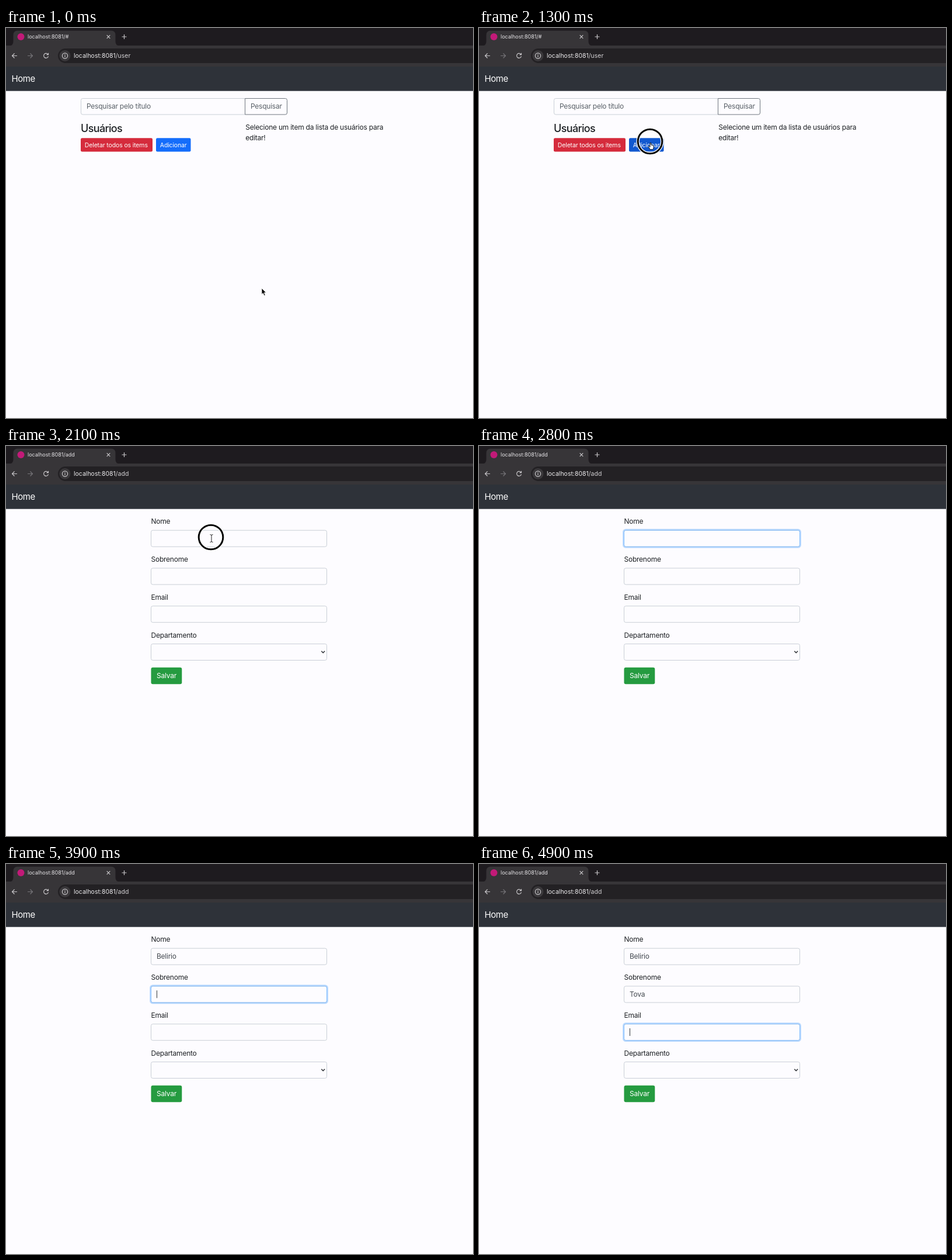
These frames come from a looping animation (800x667 px, 5 s). An HTML page:

```html
<!DOCTYPE html>
<html lang="pt">
<head>
<meta charset="utf-8">
<title>Cadastro</title>
<style>
  html, body { margin: 0; width: 100%; height: 100%; overflow: hidden; background: #fdfcff; }
  svg { display: block; width: 100%; height: 100%; }
  text { font: 12px Inter, "Liberation Sans", sans-serif; letter-spacing: -.02em; fill: #1d2024; white-space: pre; }
  .small { font-size: 10.5px; letter-spacing: -.013em; fill: #fff; }
  .title { font-size: 9px; letter-spacing: 0; fill: #e6e4e7; }
  .url { font-size: 10.5px; letter-spacing: 0; fill: #ecebed; }
  .brand { font-size: 15px; letter-spacing: -.03em; fill: #fff; }
  .heading { font-size: 18px; font-weight: 500; letter-spacing: -.036em; }
  .muted { fill: #596067; }
  .value { fill: #43494f; }
  .box { fill: #fdfcff; stroke: #c9cfd6; }
  .icon { fill: none; stroke: #c9c7ca; stroke-width: 1.2; }
</style>
</head>
<body>
<svg viewBox="0 0 800 667">
  <rect width="800" height="667" fill="#fdfcff"/>

  <!-- browser bars -->
  <rect width="800" height="31" fill="#1e1b1f"/>
  <rect y="30" width="800" height="37" fill="#373538"/>
  <path d="M5 30.5q7.5 0 7.5-7.500V12q0-7.500 7.500-7.500H180q7.500 0 7.500 7.500V23q0 7.500 7.500 7.500z" fill="#373538"/>
  <circle cx="25.500" cy="15" r="6" fill="#c21a78"/>
  <text class="title" id="tab" x="37" y="18.200"></text>
  <path class="icon" d="M172.700 12.200l5.600 5.600m0-5.600l-5.600 5.600M198.500 15h8m-4-4v8"/>
  <path class="icon" d="M19 47.500H10.500m4-4l-4 4 4 4"/>
  <path class="icon" d="M37 47.500h8.500m-4-4l4 4-4 4" style="stroke:#767478"/>
  <path class="icon" d="M72 45.200a4 4 0 1 0 .5 3.200M72.500 42.800v2.900h-2.900"/>
  <rect x="89" y="35" width="730" height="25" rx="12.500" fill="#232124"/>
  <circle cx="101" cy="47.500" r="9.500" fill="#3a383b"/>
  <circle class="icon" cx="101" cy="47.500" r="4.600"/>
  <path class="icon" d="M101 46.800v3M101 44.700v1.200"/>
  <text class="url" x="116" y="51.300">localhost:8081<tspan id="path" fill="#d2d0d3"></tspan></text>

  <rect y="66" width="800" height="41.700" fill="#2e3239"/>
  <text class="brand" x="9.500" y="92.200">Home</text>

  <g id="list">
    <path class="box" d="M409.500 120.500H131.500q-3 0-3 3v21.500q0 3 3 3H409.500z"/>
    <path d="M409.500 120.500h69q3 0 3 3v21.500q0 3-3 3h-69z" fill="none" stroke="#6f777f"/>
    <text class="muted" x="138" y="138.300">Pesquisar pelo título</text>
    <text class="muted" x="419" y="138.300">Pesquisar</text>
    <text class="heading" x="128" y="178">Usuários</text>
    <rect x="128" y="188.300" width="123" height="23.300" rx="2.300" fill="#d52b3c"/>
    <text class="small" x="134.800" y="204">Deletar todos os items</text>
    <rect id="add" x="257" y="188.300" width="59.500" height="23.300" rx="2.300"/>
    <text class="small" x="263.800" y="204">Adicionar</text>
    <text x="410.300" y="174">Selecione um item da lista de usuários para</text>
    <text x="410.300" y="192">editar!</text>
  </g>

  <g id="form">
    <g id="fields"></g>
    <path d="M540.300 350.800l2.900 2.900 2.900-2.900" fill="none" stroke="#2b2f33" stroke-width="1.500"/>
    <rect x="248.500" y="378.700" width="52.800" height="28.500" rx="3" fill="#259b40"/>
    <text x="258" y="397.400" style="fill:#fff">Salvar</text>
    <rect id="caret" width="1" height="13" fill="#33383d"/>
  </g>

  <g id="ring" fill="none">
    <circle r="20.800" stroke="#fff" stroke-width="5.500"/>
    <circle r="20.800" stroke="#050505" stroke-width="3"/>
  </g>
  <g id="pointer">
    <path id="arrow" d="M0 0v10.600l2.400-2.200 1.900 4.300 1.900-.8-1.900-4.200h3.300z" fill="#050505" stroke="#fff" stroke-width=".8"/>
    <path id="hand" d="M-.9 5.500V.8q.9-1.300 1.800 0V4q3.800.2 4.200 1.500v3q-.4 2-1.300 3.200H-.8Q-2.500 9-3.800 6.900q.6-1.600 2.900.5z" fill="#fff" stroke="#050505" stroke-width=".9"/>
    <path id="beam" d="M-2.500-6.500q2.500 0 2.500 1.500 0-1.500 2.500-1.500M0-5V5M-2.500 6.500Q0 6.500 0 5q0 1.500 2.500 1.500" fill="none" stroke="#222"/>
  </g>
</svg>

<script>
const $ = id => document.getElementById(id);
const show = (id, on) => $(id).setAttribute('display', on ? 'inline' : 'none');
const place = (id, x, y) => $(id).setAttribute('transform', `translate(${x} ${y})`);
const clamp = v => Math.max(0, Math.min(1, v));

const LOOP = 5000, STEP = 100, PAGE_CHANGE = 1500, ROW = 64.75;

// focus: [from, until]; typed: [time, letters shown]
const fields = [
  { label: 'Nome', text: 'Belirio', focus: [2200, 3800],
    typed: [[3000, 1], [3200, 2], [3400, 3], [3500, 5], [3600, 7]] },
  { label: 'Sobrenome', text: 'Tova', focus: [3800, 4700],
    typed: [[4200, 1], [4300, 2], [4400, 3], [4500, 4]] },
  { label: 'Email', text: '', focus: [4700, LOOP], typed: [] },
  { label: 'Departamento', text: '', focus: [LOOP, LOOP], typed: [] },
];

// pointer stops: [time, x, y]
const stops = [
  [0, 438, 445], [300, 438, 443], [600, 438, 434], [900, 369, 307],
  [1200, 294, 196], [1400, 294, 196], [1700, 364, 180], [2000, 352, 158],
];

$('fields').innerHTML = fields.map((f, i) => `
  <g transform="translate(248.500 ${144.2 + ROW * i})">
    <text y="-10.900">${f.label}</text>
    <rect class="glow" x="-1.200" y="-1.200" width="303.400" height="30.400" rx="4" fill="none" stroke="#007bff" stroke-width="2.400" stroke-opacity=".27"/>
    <rect class="box" width="301" height="28" rx="3"/>
    <rect class="glow" width="301" height="28" rx="3" fill="none" stroke="#80bdff"/>
    <text class="value" x="9.500" y="18.300"></text>
  </g>`).join('');
fields.forEach((f, i) => {
  const group = $('fields').children[i];
  f.value = group.querySelector('.value');
  f.glow = group.querySelectorAll('.glow');
});

function pointerAt(t) {
  const next = stops.findIndex(s => s[0] > t);
  if (next < 0) return stops.at(-1).slice(1);
  const [t0, x0, y0] = stops[next - 1], [t1, x1, y1] = stops[next];
  const k = (t - t0) / (t1 - t0);
  return [x0 + (x1 - x0) * k, y0 + (y1 - y0) * k];
}

function drawPointer(t, onForm) {
  const [x, y] = pointerAt(t);
  const overAdd = !onForm && x > 257 && x < 316 && y > 188 && y < 212;
  const overInput = onForm && y > 144 && y < 173;
  place('pointer', x, y);
  show('pointer', t < 2800);
  show('hand', overAdd);
  show('beam', overInput);
  show('arrow', !overAdd && !overInput);
  $('add').setAttribute('fill', overAdd ? '#1259d0' : '#146dfb');
  place('ring', x - 1, y - 2);
  show('ring', (t >= 1300 && t < 1500) || (t >= 2100 && t < 2300));
}

function drawFields(t) {
  let caret = false;
  fields.forEach((f, i) => {
    const [from, until] = f.focus;
    const typed = f.typed.filter(s => s[0] <= t);
    f.value.textContent = f.text.slice(0, typed.length ? typed.at(-1)[1] : 0);
    const glow = clamp((t - from + 50) / 150) - clamp((t - until + 50) / 150);
    f.glow.forEach(g => g.setAttribute('opacity', glow));
    if (t < from || t >= until) return;
    caret = !(t >= 2700 && t < 3000);
    place('caret', 258 + f.value.getComputedTextLength(), 151.5 + ROW * i);
  });
  show('caret', caret);
}

function draw() {
  const t = Math.floor(performance.now() % LOOP / STEP) * STEP;
  const onForm = t >= PAGE_CHANGE;
  show('list', !onForm);
  show('form', onForm);
  $('tab').textContent = 'localhost:8081/' + (onForm ? 'add' : '#');
  $('path').textContent = onForm ? '/add' : '/user';
  drawPointer(t, onForm);
  drawFields(t);
  requestAnimationFrame(draw);
}
draw();
</script>
</body>
</html>
```
